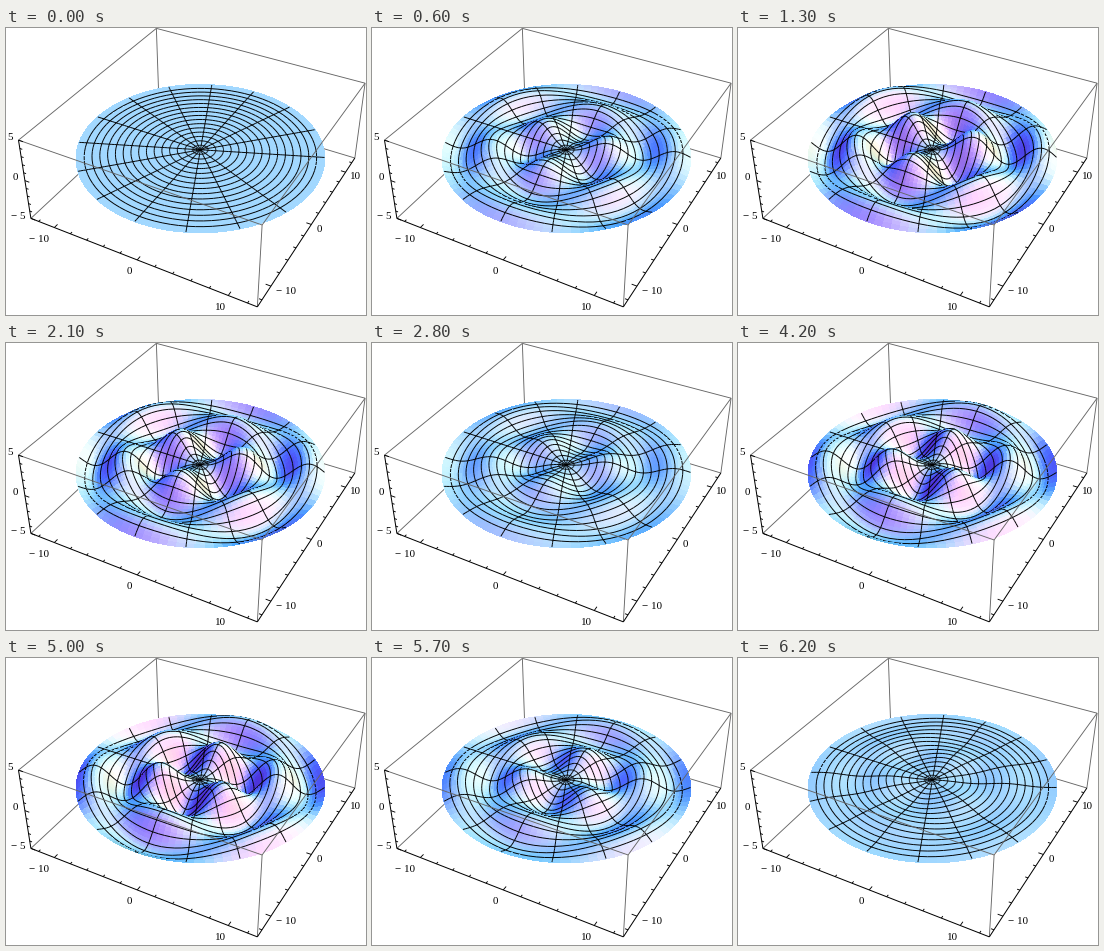
Animation, 360 px wide and 287 px high, one loop 6300 ms. Source, as a matplotlib script:

```python
import numpy as np
import matplotlib.pyplot as plt
from matplotlib.animation import FuncAnimation
from matplotlib.collections import LineCollection, PolyCollection

W, H, DPI = 360, 287, 64
PX = 72 / DPI                      # one pixel in points
FRAMES, STEP_MS = 63, 100

R, ZMAX, AMP = 13.0, 5.0, 5.0      # drum radius, box half height, amplitude
NR, NT = 48, 96                    # surface cells along radius and angle

# Camera: looks at the box centre from VIEW, in units of the box width
VIEW = np.array([1.3, -2.4, 2.0])
DIST = np.linalg.norm(VIEW)
TOWARD = VIEW / DIST
RIGHT = np.cross([0, 0, 1], TOWARD)
RIGHT /= np.linalg.norm(RIGHT)
UP = np.cross(TOWARD, RIGHT)
SCALE, CX, CY = 834, 194.4, 121.8

# Red, green and blue lights, fixed relative to the viewer
LIGHTS = np.array([[1, 0, 1], [1, 1, 1], [0, 1, 1]], float)
LIGHTS /= np.linalg.norm(LIGHTS, axis=1, keepdims=True)
AMBIENT = np.array([0.3, 0.2, 0.4])
POWER = 0.8


def project(p):
    """Screen position and depth of points with shape (..., 3)."""
    q = np.asarray(p, float) / (2 * R)
    depth = DIST - q @ TOWARD
    xy = np.stack([CX + SCALE * (q @ RIGHT) / depth,
                   CY - SCALE * (q @ UP) / depth], axis=-1)
    return xy, depth


def bessel(n, r):
    tau = (np.arange(200) + 0.5) * np.pi / 200
    return np.cos(n * tau - np.multiply.outer(r, np.sin(tau))).mean(axis=-1)


def shade(normal):
    normal = normal / np.linalg.norm(normal, axis=-1, keepdims=True)
    eye = normal @ np.stack([RIGHT, UP, TOWARD], axis=1)
    return np.clip(AMBIENT + POWER * np.clip(eye @ LIGHTS.T, 0, 1), 0, 1)


# Corner grid of the drum skin
r = np.linspace(0, R, NR + 1)
th = np.linspace(0, 2 * np.pi, NT + 1)
X, Y = np.outer(r, np.cos(th)), np.outer(r, np.sin(th))
SHAPE = AMP * np.outer(bessel(3, r), np.sin(3 * th))

# Slopes at the cell centres
rc, tc = (r[1:] + r[:-1]) / 2, (th[1:] + th[:-1]) / 2
slope_r = AMP * np.outer((bessel(2, rc) - bessel(4, rc)) / 2, np.sin(3 * tc))
slope_t = AMP * np.outer(3 * bessel(3, rc) / rc, np.cos(3 * tc))
SLOPE_X = slope_r * np.cos(tc) - slope_t * np.sin(tc)
SLOPE_Y = slope_r * np.sin(tc) + slope_t * np.cos(tc)

CIRCLES = np.arange(NR // 16, NR, NR // 16)
SPOKES = np.arange(NT // 16, NT, NT // 16)
N_CELLS = NR * NT
N_LINES = len(CIRCLES) * NT + len(SPOKES) * NR
LINE_BIAS = 0.025                  # lifts mesh lines towards the viewer


def segments(a, b):
    """Line pieces as flat four-point polygons."""
    return np.stack([a, b, b, a], axis=2).reshape(-1, 4, 2)


def surface(swing):
    """Polygons, colours and line mask, ordered from far to near."""
    xy, depth = project(np.stack([X, Y, SHAPE * swing], axis=-1))
    cells = np.stack([xy[:-1, :-1], xy[1:, :-1], xy[1:, 1:], xy[:-1, 1:]],
                     axis=2).reshape(-1, 4, 2)
    cell_depth = (depth[:-1, :-1] + depth[1:, :-1]
                  + depth[1:, 1:] + depth[:-1, 1:]).ravel() / 4
    ring, ring_d = xy[CIRCLES], depth[CIRCLES]
    spoke, spoke_d = xy[:, SPOKES], depth[:, SPOKES]
    polys = np.concatenate([cells,
                            segments(ring[:, :-1], ring[:, 1:]),
                            segments(spoke[:-1], spoke[1:])])
    line_depth = np.concatenate([
        ((ring_d[:, :-1] + ring_d[:, 1:]) / 2).ravel(),
        ((spoke_d[:-1] + spoke_d[1:]) / 2).ravel()])
    order = np.argsort(-np.concatenate([cell_depth, line_depth - LINE_BIAS]),
                       kind="stable")
    normal = np.stack([-SLOPE_X * swing, -SLOPE_Y * swing,
                       np.ones_like(SLOPE_X)], axis=-1)
    colors = np.concatenate([shade(normal).reshape(-1, 3),
                             np.zeros((N_LINES, 3))])
    return polys[order], colors[order], order >= N_CELLS


fig = plt.figure(figsize=(W / DPI, H / DPI), dpi=DPI, facecolor="white")
ax = fig.add_axes([0, 0, 1, 1])
ax.set_xlim(0, W)
ax.set_ylim(H, 0)
ax.axis("off")


def add_lines(lines, color, width, zorder):
    ax.add_collection(LineCollection(
        [project(line)[0] for line in lines], colors=color,
        linewidths=width * PX, zorder=zorder))


def corner(x, y, z):
    return np.array([x * R, y * R, z * ZMAX])


A, B = corner(-1, -1, 1), corner(-1, -1, -1)
C, D = corner(1, -1, -1), corner(1, -1, 1)
E, F = corner(1, 1, -1), corner(1, 1, 1)
G, K = corner(-1, 1, 1), corner(-1, 1, -1)

add_lines([(G, K), (K, E), (K, B), (A, G), (G, F)], "0.4", 0.9, 1)
add_lines([(A, D), (D, F), (D, C), (F, E)], "0.4", 0.9, 3)
add_lines([(A, B), (B, C), (C, E)], "black", 1, 4)

ticks = []
for v in range(-12, 13, 2):
    size = 0.55 if v % 10 == 0 else 0.3
    ticks.append([(v, -R, -ZMAX), (v, -R + size, -ZMAX)])
    ticks.append([(R, v, -ZMAX), (R - size, v, -ZMAX)])
for v in range(-5, 6):
    size = 0.55 if v % 5 == 0 else 0.3
    ticks.append([(-R, -R, v), (-R + size, -R, v)])
add_lines(ticks, "black", 0.9, 4)

LABELS = [
    ("5", 4.5, 108.5), ("0", 9.5, 148.5), ("\u2212 5", 12.5, 187.5),
    ("\u2212 10", 33, 210), ("0", 123.5, 243), ("10", 214, 279),
    ("\u2212 10", 280.5, 263), ("0", 313.5, 201), ("10", 349.5, 147.5),
]
for text, x, y in LABELS:
    ax.text(x, y, text, family="Liberation Serif", size=11 * PX,
            ha="center", va="center_baseline", zorder=5)

skin = PolyCollection([], closed=True, zorder=2, snap=False)
ax.add_collection(skin, autolim=False)


def draw(i):
    polys, colors, is_line = surface(np.sin(0.1 * i))
    skin.set_verts(polys)
    skin.set_facecolor(colors)
    skin.set_edgecolor(colors)
    skin.set_linewidth(np.where(is_line, 0.95, 0.5) * PX)
    skin.set_antialiased(is_line.tolist())
    return [skin]


anim = FuncAnimation(fig, draw, frames=FRAMES, interval=STEP_MS,
                     repeat=True, repeat_delay=0)
plt.show()
```
